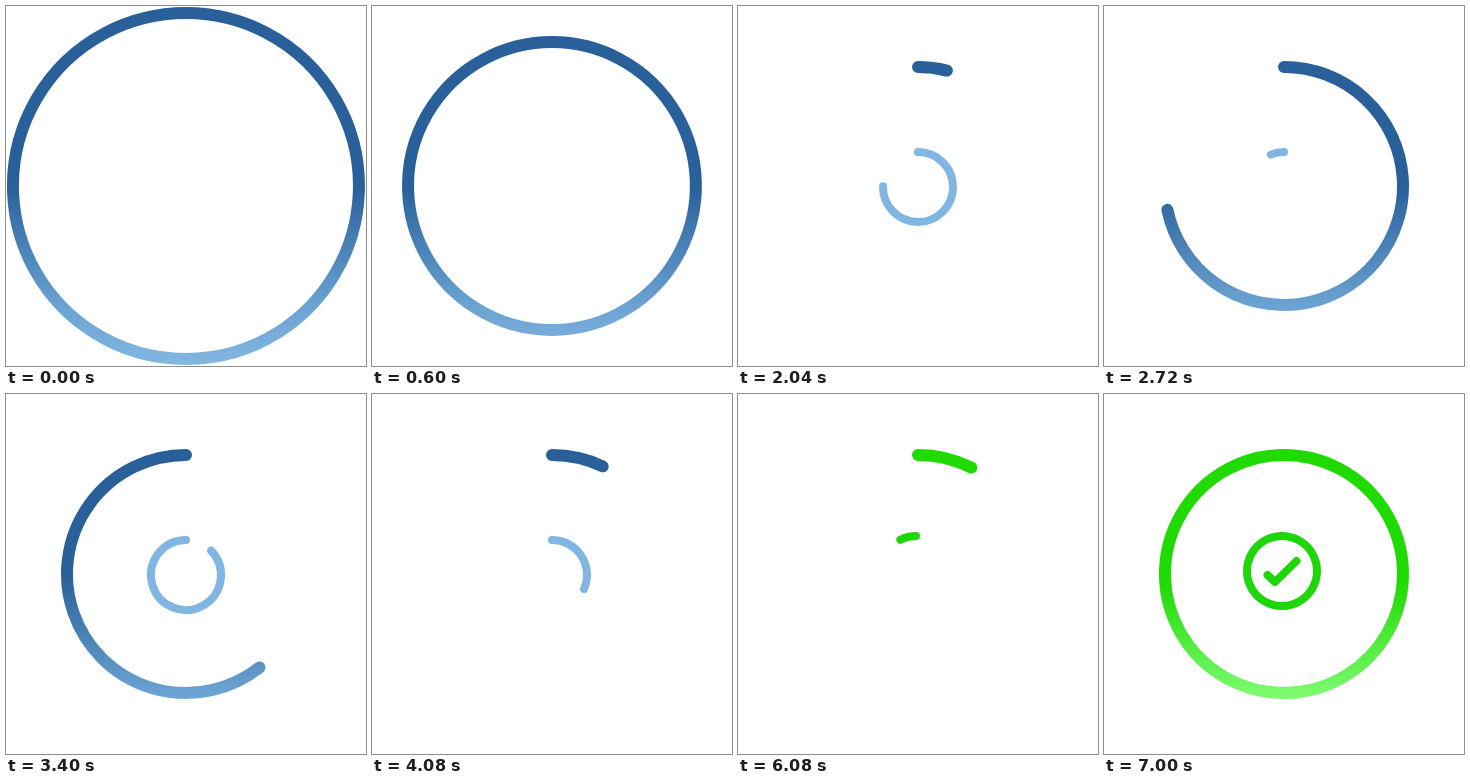
An HTML page that plays this animation: 360x360 px, repeating every 8000 ms.

```html
<!DOCTYPE html>
<html lang="en">
<head>
<meta charset="utf-8">
<title>Loader with success check</title>
<style>
  html, body { margin: 0; width: 100%; height: 100%; overflow: hidden; background: #fff; }
  svg { display: block; width: 100vw; height: 100vh; }
  path { fill: none; stroke-linecap: round; stroke-linejoin: round; }
  #outer { stroke-width: 12; }
  #inner, #check { stroke-width: 8; }
  #check { stroke: #1fd60a; }
</style>
</head>
<body>
<svg viewBox="0 0 360 360">
  <defs>
    <linearGradient id="blue" gradientUnits="userSpaceOnUse" x1="0" y1="180" x2="0" y2="360">
      <stop offset="0" stop-color="#29609a"/>
      <stop offset=".66" stop-color="#6aa2d2"/>
      <stop offset="1" stop-color="#82b7e1"/>
    </linearGradient>
    <linearGradient id="green" gradientUnits="userSpaceOnUse" x1="0" y1="190" x2="0" y2="305">
      <stop offset="0" stop-color="#20da04"/>
      <stop offset="1" stop-color="#80fb74"/>
    </linearGradient>
  </defs>
  <path id="outer"/>
  <path id="inner"/>
  <path id="check" d="M163.5 181 L171 188 L192.5 167" pathLength="1"/>
</svg>
<script>
const LOOP = 8000, TICK = 40;
const [outer, inner, check] = ['outer', 'inner', 'check'].map(id => document.getElementById(id));

// Time in ms against turns made by the outer ring
const pace = [[1000, 0], [1400, .4], [2720, 1.718], [4080, 3.07],
              [5200, 4.226], [6000, 5], [6880, 5.815], [7000, 6]];

const clamp = x => Math.min(1, Math.max(0, x));

function turnsAt(t) {
  if (t <= pace[0][0]) return 0;
  for (let i = 1; i < pace.length; i++) {
    const [t0, a] = pace[i - 1], [t1, b] = pace[i];
    if (t <= t1) return a + (b - a) * (t - t0) / (t1 - t0);
  }
  return 6;
}

// Clockwise arc; from and to are turns measured from the top
function arc(cx, cy, r, from, to) {
  const span = Math.min(to - from, .9999);
  if (span < .001) return '';
  const point = turn => {
    const a = turn * 2 * Math.PI;
    return `${(cx + r * Math.sin(a)).toFixed(3)} ${(cy - r * Math.cos(a)).toFixed(3)}`;
  };
  return `M${point(from)} A${r} ${r} 0 ${span > .5 ? 1 : 0} 1 ${point(from + span)}`;
}

// Even turns sweep the first span, odd turns the second
function sweep(turns) {
  const part = turns % 1;
  return Math.floor(turns) % 2 ? [0, part] : [part, 1];
}

function paint(el, d, stroke) {
  el.setAttribute('d', d);
  el.setAttribute('stroke', stroke);
}

function draw(t) {
  const turns = turnsAt(t);
  const done = t >= 6000;
  if (done) {
    const p = turns - 5;
    paint(outer, arc(180, 180, 119, 0, p), 'url(#green)');
    paint(inner, arc(178, 177, 35, 1 - p, 1), '#1fd60a');
  } else {
    const r = 173 - 54 * clamp((t - 320) / 520);
    paint(outer, arc(180, 180, r, ...sweep(turns)), 'url(#blue)');
    // The inner ring runs counterclockwise, starting empty
    const [a, b] = sweep(turns * 1.2 + 1);
    paint(inner, arc(180, 181, 35, 1 - b, 1 - a), '#80b6e1');
  }
  const drawn = clamp((t - 6880) / 120);
  check.style.visibility = drawn ? 'visible' : 'hidden';
  check.style.strokeDasharray = drawn < 1 ? `${drawn} 2` : 'none';
}

const start = performance.now();
function frame() {
  const t = (performance.now() - start) % LOOP;
  draw(Math.floor(t / TICK) * TICK);
  requestAnimationFrame(frame);
}
frame();
</script>
</body>
</html>
```
